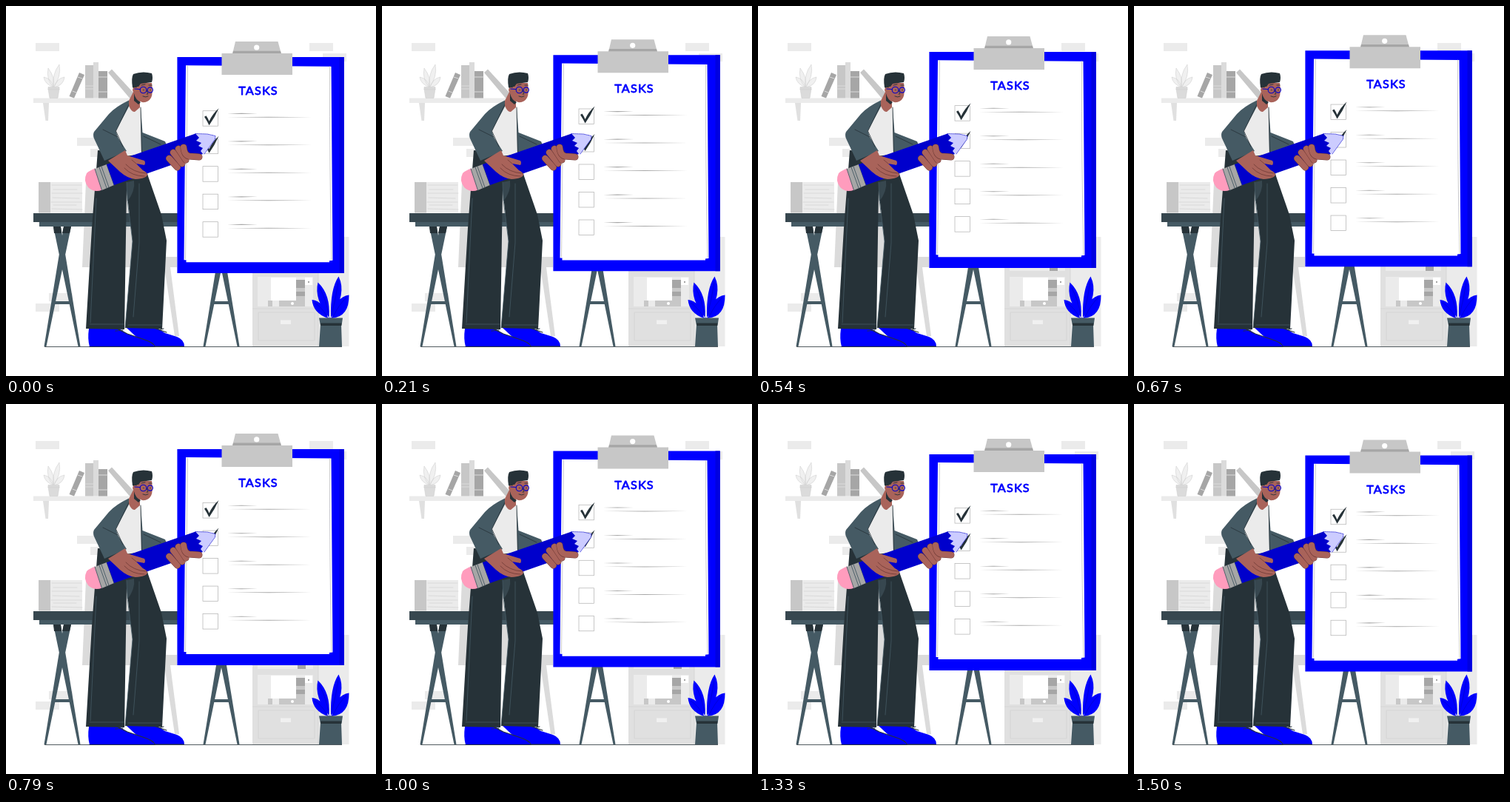
Recreate the animation shown at these times as an HTML page. Size 500 by 500 pixels, loop 1.54 s.

```html
<!DOCTYPE html>
<html lang="en">
<head>
<meta charset="utf-8">
<title>Tasks</title>
<style>
  html, body { margin: 0; width: 100%; height: 100%; overflow: hidden; background: #fff; }
  svg { display: block; width: 100vw; height: 100vh; }
  .title { font: 400 16.2px Lato, "Open Sans", sans-serif; letter-spacing: 1.2px; text-anchor: middle;
    fill: #00f; stroke: #00f; stroke-width: .8px; stroke-linejoin: round; }
  .line { fill: none; stroke-linecap: round; stroke-linejoin: round; }
</style>
</head>
<body>
<svg viewBox="0 0 500 500">
  <defs>
    <g id="trestle">
      <path fill="#455a64" d="M78 298H88L54.500 460H51.500ZM64 298H74L100.500 460H97.500ZM65 399H90V403H65Z"/>
      <path fill="#263238" d="M64 298H74L75 307H65ZM78 298H88L86 307H76Z"/>
    </g>
    <g id="row">
      <rect x="266" y="142" width="20.500" height="20.500" fill="none" stroke="#b0b0b0" stroke-width=".7"/>
      <path fill="#a6a6a6" d="M299 145.700L318 145.100 340 145.600 318 146.200ZM299 150.500L355 150.100 413 150.500 355 151.100Z"/>
    </g>
    <path id="check" fill="#263238" d="M268 150L270.500 148.500Q273 152 274.500 156 279 146 287.500 138.500 282 151 274.500 161.500 272 156 268 150Z"/>
    <g id="fingers" class="line">
      <path id="f" d=""/>
    </g>
  </defs>

  <!-- wall -->
  <path fill="#ebebeb" d="M40 50h32v11h-32ZM410 50h32v11h-32ZM428 64h32v11h-32ZM96 178h32v11h-32ZM114 193h32v11h-32ZM40 402h32v11h-32ZM58 388h32v11h-32Z"/>

  <!-- shelf -->
  <path fill="#ebebeb" d="M37 124.500H172V131H37Z"/>
  <path fill="#e0e0e0" d="M50 131H58L57 155H53.500Z"/>
  <path fill="#a6a6a6" d="M99 90L106 93 92 124.500 85.500 122ZM125 88H137V124.500H125Z"/>
  <path fill="#c7c7c7" d="M107 80H118V124.500H107ZM138 90L143 85.500 172 117V124.500H167Z"/>
  <path fill="#dbdbdb" d="M118 76H125V124.500H118Z"/>
  <path class="line" stroke="#dbdbdb" d="M97 96L103 98M90 115L95 117M107 108H118M107 112H118M125 96H137M125 116H137"/>
  <g fill="#f0f0f0" stroke="#d0d0d0" stroke-width=".6">
    <path d="M64 110Q52 105 51 96 62 98 64 110ZM64 110Q54 99 57 84 67 97 64 110ZM64 110Q62 92 72 79 75 96 64 110ZM65 110Q68 98 79 96 78 107 65 110Z"/>
    <path fill="#dbdbdb" d="M57 112H72L70 124.500H59ZM57 109.500H72V113H57Z"/>
  </g>

  <!-- cabinet -->
  <path fill="#ebebeb" d="M333 312H463.500V460H333Z"/>
  <path fill="#e0e0e0" d="M333 312H422V460H333Z"/>
  <path fill="#ebebeb" d="M340 366H415V406H340ZM340 320H415V358H340Z"/>
  <path fill="#fff" d="M358 367H392V398H358ZM404 367H414V377H404Z"/>
  <path fill="#a6a6a6" d="M392 370H404V381H392ZM392 386H404V392H392ZM394 335H405V358H394ZM408 372h2v2h-2Z"/>
  <path fill="#c7c7c7" d="M392 381H404V386H392ZM392 392H404V406H392ZM354 398H360V406H354ZM369 398H392V406H369Z"/>
  <circle cx="387" cy="402" r="2" fill="#fff"/>
  <path fill="none" stroke="#d2d2d2" stroke-width=".8" d="M341 414H417V452H341ZM333 409H422M422 352V460"/>
  <path fill="#f0f0f0" d="M371 424.500H385V430H371Z"/>

  <!-- chair and desk -->
  <path fill="#dbdbdb" d="M108 238H174V339H231V353H103ZM214 353H222L234 446H228Z"/>
  <path fill="#c7c7c7" d="M44 238H60V279.500H44Z"/>
  <path fill="#ebebeb" d="M60 238H103V279.500H60Z"/>
  <path class="line" stroke="#d2d2d2" stroke-width=".7" d="M62 242H102M64 248H96M62 253H103M63 259L99 260M61 265H102M64 269H95M62 274L103 275"/>
  <path fill="#37474f" d="M37 280H250V292H37Z"/>
  <path fill="#455a64" d="M45 292H250V298H45Z"/>
  <use href="#trestle"/>
  <use href="#trestle" x="215"/>
  <path stroke="#263238" stroke-width=".8" d="M52 460.500H454"/>

  <!-- plant -->
  <path fill="#00f" d="M435 422Q415 415 413.500 397 430 399 435 422ZM436.500 421Q416 396 421.500 373.500 439 390 436.500 421ZM439 421Q438 382 449.500 365.500 461 389 439 421ZM440 422Q445 393 463.500 390.500 464 420 440 422Z"/>
  <path class="line" stroke="#0000b0" stroke-width=".5" d="M434 420Q427 407 417 401M436 418Q433 398 424 381M440 417Q446 395 449 373M442 420Q450 403 460 394"/>
  <path class="line" stroke="#00f" d="M435 422H440"/>
  <path fill="#455a64" d="M423 421.500H455L453.500 432H425ZM425 430H453L454 460H423Z"/>
  <path fill="#263238" d="M425 428.500H453.500L453 432H425.500Z"/>

  <!-- clipboard -->
  <g id="board">
    <path fill="#00f" d="M231.400 69.300H456.800V361.300H231.400Z"/>
    <path fill="#0000e0" d="M450.500 69.300H456.800V361.300H450.500Z"/>
    <path fill="#fff" d="M243 80.500L439.500 82 441.500 344 437 344.500V346.500H243.500V343.500H240.500Z"/>
    <path class="line" stroke="#b8b8b8" stroke-width=".7" d="M245.500 81.500Q244 210 242.500 342M437.500 82Q437 220 440 343"/>
    <path fill="#c7c7c7" d="M310 48.300H367.500L372 65H306Z"/>
    <path fill="#a6a6a6" d="M307 61H371L372 65H306Z"/>
    <path fill="#c7c7c7" d="M291.500 64.300H387V93.300H291.500Z"/>
    <circle cx="338.700" cy="56.300" r="3.600" fill="#fff"/>
    <text class="title" x="341" y="120.300">TASKS</text>
    <g id="rows"></g>
    <use href="#check"/>
    <use href="#check" y="37.500"/>
  </g>

  <!-- legs -->
  <path fill="#00f" d="M163 435H204L215 442 231 447Q241 451 241 460H190Z"/>
  <path fill="#00f" d="M112 436H153L164 443 186 450.500Q201 455 201 460.500H113Q110 450 112 436Z"/>
  <path class="line" stroke="#263238" stroke-width="1.200" d="M113 460.500H201M201 460H240M150 436L164 443 186 450.500Q200 455 201 460M148 439L158 438M200 435L217 441M209 437L213 436"/>
  <path fill="#263238" d="M124 195L184 198 192 230 210 282 217 317 211 436.500 161 435 171 318 163 248 160 437 108 436 116 300Z"/>
  <path fill="#37474f" d="M164 264Q175 250 173 236L163 238Z"/>
  <path class="line" stroke="#455a64" stroke-width=".8" d="M163 238L164 262 171 318 161 435M113 430H159M122 260L114 428M165 431H210M180 240V320L172 420"/>

  <!-- torso -->
  <path fill="#ebebeb" d="M164 133L182 137 186 200 160 203 147 170Z"/>
  <path fill="#455a64" d="M166 127.500Q148 136 139 146L119 170Q117 174 119 179L133 209 163 196 151 177 148.500 169 167 134ZM182 137L184.500 171 215 183 219 193 196 207 183 201Z"/>
  <path class="line" stroke="#263238" stroke-width=".8" d="M166 133L148.500 169 158 190M182 137L183.500 200M131 167L151 177M186 176L209 187"/>

  <!-- head -->
  <path fill="#a9635a" d="M172 116L166 128V135Q170 144 174 143L181 137V126Z"/>
  <path fill="#a9635a" d="M172 104H197Q199 118 196 124 192 131 184 130 176 128 172 117Z"/>
  <path fill="#263238" d="M171 110Q169 97 172 92 184 87.500 197 91 199 97 197 103L182 105 179 109 177 109 175 113ZM173 118Q175 127 182 130L179 133 173 128Z"/>
  <circle cx="174.500" cy="113.500" r="3.400" fill="#a9635a"/>
  <g class="line" stroke="#00c" stroke-width="1.100">
    <circle cx="185.500" cy="113.500" r="4.300"/><circle cx="194.800" cy="113.500" r="3.600"/>
    <path d="M174 112L181 112.500"/>
  </g>
  <path class="line" stroke="#263238" stroke-width=".9" d="M183 107L188 106M193 107L197 107M186 113V114M195 113V114M190 114L192 119H190M185 122Q189 124 192 122"/>

  <!-- pencil -->
  <path fill="#ff9cbd" d="M121 219.500L130 248.500Q119 253 111 245 104 236 109 226 113 222 121 219.500Z"/>
  <path fill="#a6a6a6" d="M120 220L136 214 146 242 129.500 249Z"/>
  <path class="line" stroke="#455a64" stroke-width=".9" d="M120 220L129.500 249M126 218L136 246M129 217L139 245M136 214L146 242"/>
  <path fill="#ccf" d="M255 172.500L272 173 283 175.500 282.500 180 268 200 255 196Z"/>
  <path fill="#00c" d="M136 214L256 172.500 261 178 257 182 264 185 260 189 266 192 263 196 266 200 146 242Z"/>
  <path class="line" stroke="#00c" stroke-width=".6" stroke-dasharray="1.500 1" d="M256 172.500L272 173 283 175.500 282.500 180 268 200"/>

  <!-- hands -->
  <path fill="#a9635a" d="M138 209L161 195 164 202 187 209Q189 212 187 215L176 213 185 222Q191 225 191 228 190 233 175 234 164 233 154 224Z"/>
  <path class="line" stroke="#6f3a36" stroke-width=".8" d="M162 214Q172 225 189 226M160 219Q170 230 187 230M170 208L176 213"/>
  <g id="hand" class="line"></g>
</svg>
<script>
  const FRAMES = 37, LOOP = 1540, ROW_GAP = 37.5, PEAK = 17;
  const FINGERS = ["M220.500 206L231.500 218", "M226 198L238 213", "M233 193L243 208", "M240 191Q241 202 248 203L261 204"];
  const board = document.getElementById("board");

  document.getElementById("rows").innerHTML =
    Array.from({ length: 5 }, (_, i) => `<use href="#row" y="${i * ROW_GAP}"/>`).join("");

  document.getElementById("hand").innerHTML = FINGERS.map(d =>
    `<path d="${d}" stroke="#6f3a36" stroke-width="9"/><path d="${d}" stroke="#a9635a" stroke-width="8"/>`).join("");

  // Linear float of 10 px, stepped at 24 frames per second
  function draw(now) {
    const step = Math.floor((now % LOOP) / LOOP * FRAMES + 0.1);
    const phase = (step - PEAK + FRAMES) % FRAMES / FRAMES;
    const y = 20 * Math.min(phase, 1 - phase) - 9.5;
    board.setAttribute("transform", `translate(0 ${y.toFixed(2)})`);
    requestAnimationFrame(draw);
  }
  draw(performance.now());
</script>
</body>
</html>
```
